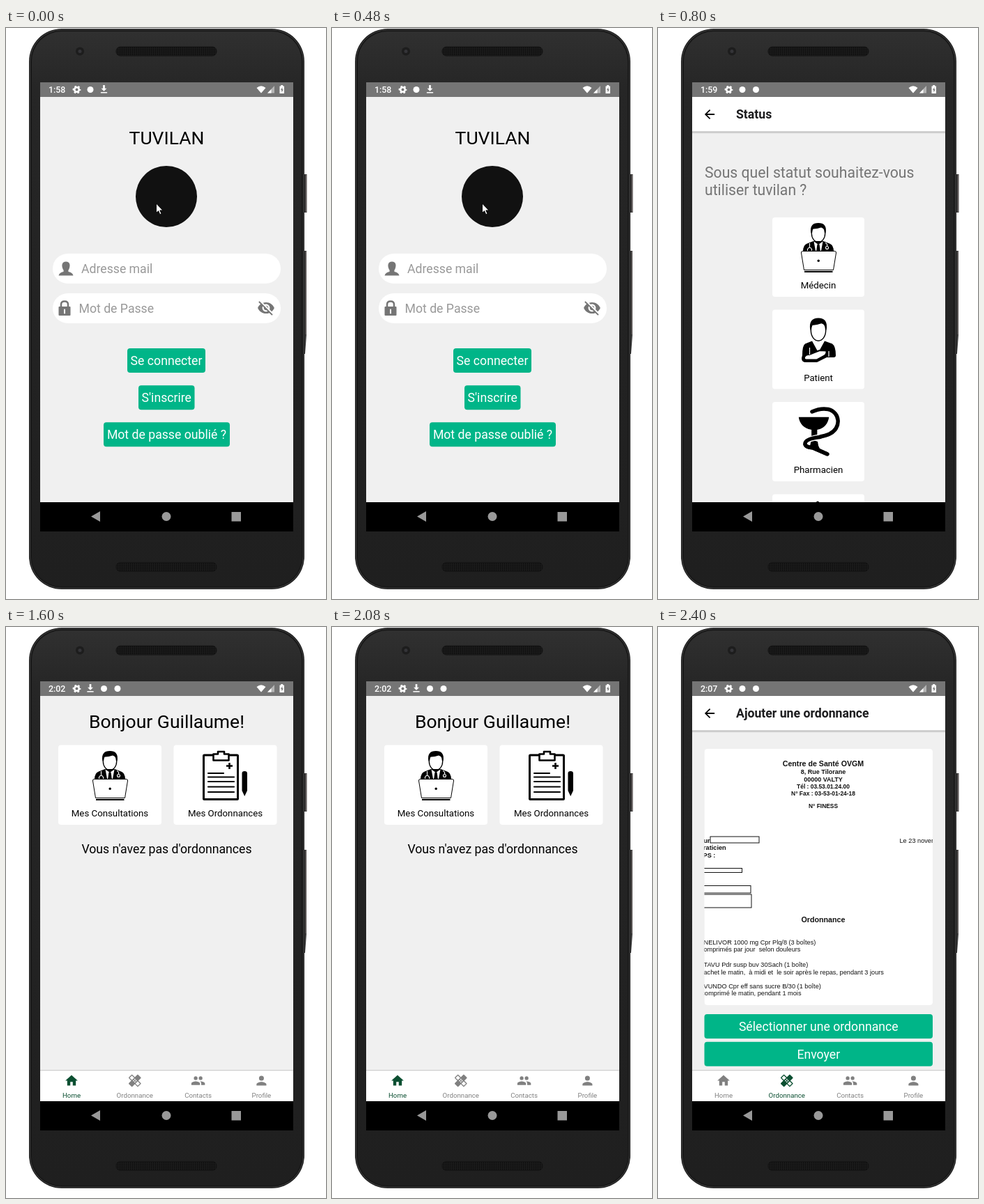
An HTML page for the animation above (3.2 s loop, 459x820 px).

```html
<!DOCTYPE html>
<html lang="fr">
<head>
<meta charset="utf-8">
<title>Application mobile</title>
<style>
html, body { margin: 0; width: 100%; height: 100%; overflow: hidden; background: #fff; }
svg { display: block; width: 100%; height: 100%; }
text { font-family: Roboto, sans-serif; white-space: pre; }
.doc text { font-family: "Liberation Sans", Arial, sans-serif; }
</style>
</head>
<body>
<svg id="stage" viewBox="0 0 459 820" xmlns="http://www.w3.org/2000/svg">
  <defs>
    <linearGradient id="shell" x2="0" y2="1">
      <stop offset="0" stop-color="#303030"/><stop offset=".1" stop-color="#262626"/><stop offset="1" stop-color="#1f1f1f"/>
    </linearGradient>
    <linearGradient id="shade" x2="0" y2="1">
      <stop offset="0" stop-color="#000" stop-opacity=".3"/><stop offset="1" stop-color="#000" stop-opacity="0"/>
    </linearGradient>
    <pattern id="mesh" width="3" height="3" patternUnits="userSpaceOnUse">
      <rect width="3" height="3" fill="#1c1c1c"/><circle cx="1.5" cy="1.5" r="1" fill="#0a0a0a"/>
    </pattern>
    <clipPath id="screen"><rect x="49" y="78" width="363" height="603"/></clipPath>
    <clipPath id="paper"><rect x="66.5" y="175" width="327.5" height="368" rx="4"/></clipPath>

    <g id="head">
      <ellipse cx="230" cy="295" rx="9.7" ry="12.5" fill="#fff" stroke="#000" stroke-width="1.3"/>
      <path d="M219.5 295C217.5 284 222 280 230 280S242.500 284 240.500 295L238.500 289Q236 287 234 286.500Q227 289 222 288.500Z"/>
    </g>
    <g id="doctor">
      <use href="#head"/>
      <path d="M208 321Q208 311.500 214 309.500L223 306H237L246 309.500Q252 311.500 252 321Z"/>
      <path d="M223.500 306.500L230 311L236.500 306.500L234 320H226Z" fill="#fff"/>
      <path d="M228.500 310.500H231.500L232.800 320H227.200Z"/>
      <path d="M217.500 309V315M214.500 320V317.500Q217.500 313 220.500 317.500V320M240 308.500Q243.500 310 242.500 313" fill="none" stroke="#fff" stroke-width="1.1"/>
      <circle cx="242.500" cy="315.500" r="2" fill="none" stroke="#fff" stroke-width="1.100"/>
      <path d="M207.500 320.500H253.500Q255.800 320.500 255.500 323L251.500 347.500H209.500L205.500 323Q205.200 320.500 207.500 320.500Z" fill="#fff" stroke="#000"/>
      <circle cx="230.200" cy="334.300" r="1.700"/>
      <path d="M210 350H250.500" stroke="#000" stroke-width="2"/>
    </g>
    <g id="patient">
      <use href="#head" transform="translate(-23 84.800) scale(1.100 1.185)"/>
      <path d="M207 470Q207 456 211 453.500L221 449.500L230 466L239 449.500L250 453.500Q255 457 255 470Q255 473 252 473H242L228 480H212Q206 480 206 474Z"/>
      <path d="M222 450L230 464L238 450L234 452H226Z" fill="#fff"/>
      <path d="M232 463L241.500 463.500Q242.500 468.500 238 471L228 476.500H212.500Q209 476 210 472.500Q212 468.500 217 469L223 466.500Z" fill="#fff" stroke="#000" stroke-width="2.200" stroke-linejoin="round"/>
      <path d="M217.500 469V459M245 464V472" stroke="#fff" stroke-width="1.200"/>
    </g>
    <g id="cup" fill="none">
      <path d="M221 551Q233 545.500 244 547.500C262 552 263 575 246 583C234 589 211 588 211 597Q211 602 222 603L243 612" stroke="#000" stroke-width="5.500" stroke-linecap="round"/>
      <path d="M201 558H246Q244 574 229 577.500V590H219.500V577.500Q203 574 201 558Z" fill="#000" stroke="#fff" stroke-width="1.300"/>
      <path d="M219.500 590.500Q219 600 216 604H232Q229.500 600 229 594" fill="#000"/>
      <path d="M211.500 597Q212 590 232 587.500" stroke="#fff" stroke-width="8"/>
      <path d="M211 597Q211 590 232 587.500M211 597Q211 602 222 602.500L242 611.500" stroke="#000" stroke-width="5.500" stroke-linecap="round"/>
    </g>
    <g id="clipboard" fill="none" stroke="#000">
      <rect x="283.500" y="184" width="49" height="63.500" rx="1" stroke-width="3"/>
      <path d="M297.500 191.500V182.500H304V179H313V182.500H319.500V191.500Z" fill="#fff" stroke-width="2.600" stroke-linejoin="round"/>
      <path d="M320.500 195V204M316 199.500H325" stroke-width="2.600"/>
      <path d="M290 210H312M290 215.500H327M290 222H327M290 229.500H327M290 237H327" stroke-width="2.200" stroke-linecap="round"/>
      <path d="M338.500 210Q338.500 207 342.200 207T346 210V235L342.200 243L338.500 235Z" fill="#000" stroke="none"/>
    </g>
  </defs>

  <g id="phone">
    <path d="M426 210H431.500V265H426ZM426 320H431V441L429 468H426Z" fill="#3a3a3a"/>
    <path d="M430.500 211V264M430 321V440" stroke="#6b6261"/>
    <rect x="33" y="1" width="395" height="805" rx="47" fill="#181818"/>
    <rect x="34.500" y="2.500" width="392" height="802" rx="45.500" fill="none" stroke="#454545"/>
    <rect x="37" y="5" width="387" height="797" rx="43" fill="url(#shell)"/>
    <circle cx="106" cy="33.500" r="6" fill="#1d1d1d"/><circle cx="106" cy="33.500" r="2.500" fill="#343438"/>
    <rect x="158" y="27" width="144" height="13" rx="6" fill="url(#mesh)" stroke="#141414"/>
    <rect x="158" y="767.500" width="144" height="13" rx="6" fill="url(#mesh)" stroke="#141414"/>
    <rect x="49" y="78" width="363" height="645" fill="#f0f0f0"/>
  </g>
  <g id="view" clip-path="url(#screen)"></g>
  <g id="nav">
    <rect x="49" y="681" width="363" height="42" fill="#000"/>
    <path d="M122 701.500L135 694V709ZM323.500 695H337V708.500H323.500Z" fill="#999"/>
    <circle cx="230" cy="701.500" r="6.500" fill="#999"/>
  </g>
</svg>
<script>
const GREEN = '#00b588', DIM = '#757575', UNIT = 17.66;

const paths = {
  back: 'M20 11H7.83l5.59-5.59L12 4l-8 8 8 8 1.41-1.41L7.83 13H20v-2z',
  home: 'M10 20v-6h4v6h5v-8h3L12 3 2 12h3v8z',
  heal: 'M17.73 12.02l3.98-3.98c.39-.39.39-1.02 0-1.41l-4.34-4.34c-.39-.39-1.02-.39-1.41 0l-3.98 3.98L8 2.29C7.8 2.1 7.55 2 7.29 2c-.25 0-.51.1-.7.29L2.25 6.63c-.39.39-.39 1.02 0 1.41l3.98 3.98L2.25 16c-.39.39-.39 1.02 0 1.41l4.34 4.34c.39.39 1.02.39 1.41 0l3.98-3.98 3.98 3.98c.2.2.45.29.71.29.26 0 .51-.1.71-.29l4.34-4.34c.39-.39.39-1.02 0-1.41zM12 9a1 1 0 0 1 0 2 1 1 0 0 1 0-2zM7.29 10.96L3.66 7.34l3.63-3.63 3.62 3.62zM10 13a1 1 0 0 1 0-2 1 1 0 0 1 0 2zM12 15a1 1 0 0 1 0-2 1 1 0 0 1 0 2zM14 11a1 1 0 0 1 0 2 1 1 0 0 1 0-2zM16.66 20.34l-3.63-3.62 3.63-3.63 3.62 3.62z',
  people: 'M16 11a3 3 0 1 0 0-6 3 3 0 0 0 0 6zM8 11a3 3 0 1 0 0-6 3 3 0 0 0 0 6zM8 13c-2.33 0-7 1.17-7 3.5V19h14v-2.500c0-2.330-4.670-3.500-7-3.500zM16 13c-.29 0-.62.02-.97.05 1.16.84 1.97 1.97 1.97 3.450V19h6v-2.500c0-2.330-4.670-3.500-7-3.500z',
  person: 'M12 12a4 4 0 1 0 0-8 4 4 0 0 0 0 8zM12 14c-2.670 0-8 1.340-8 4v2h16v-2c0-2.660-5.330-4-8-4z',
  hidden: 'M12 7c2.76 0 5 2.24 5 5 0 .65-.13 1.26-.36 1.83l2.92 2.92c1.51-1.26 2.7-2.89 3.43-4.75-1.73-4.39-6-7.5-11-7.5-1.4 0-2.74.25-3.98.7l2.16 2.16C10.74 7.13 11.35 7 12 7zM2 4.27l2.74 2.74C3.08 8.3 1.78 10.02 1 12c1.73 4.39 6 7.5 11 7.5 1.55 0 3.03-.3 4.38-.84L19.730 22 21 20.730 3.270 3zM7.530 9.800l1.550 1.550c-.05.21-.08.43-.08.65 0 1.660 1.340 3 3 3 .22 0 .44-.03.65-.08l1.550 1.550c-.67.33-1.410.53-2.200.53-2.760 0-5-2.240-5-5 0-.79.2-1.530.53-2.200zM11.840 9.020l3.150 3.150.02-.16c0-1.660-1.340-3-3-3z',
  load: 'M10 3h4v7h4l-6 6-6-6h4zM5 18h14v2.500H5z'
};

const text = (s, x, y, size = UNIT, fill = '#000', more = '') =>
  `<text x="${x}" y="${y}" font-size="${size}" fill="${fill}" ${more}>${s}</text>`;
const mid = (s, x, y, size, fill, more = '') => text(s, x, y, size, fill, 'text-anchor="middle" ' + more);
const box = (x, y, w, h, fill = '#fff', rx = 4, more = '') =>
  `<rect x="${x}" y="${y}" width="${w}" height="${h}" rx="${rx}" fill="${fill}" ${more}/>`;
const icon = (name, x, y, fill, k = 0.883) =>
  `<path d="${paths[name]}" fill="${fill}" transform="translate(${x} ${y}) scale(${k}) translate(-12 -12)"/>`;
const use = (id, x = 0, y = 0) => `<use href="#${id}" x="${x}" y="${y}"/>`;

const marks = {
  gear: x => `<g fill="none" stroke="#fff" transform="translate(${x} 88.500)">
    <circle r="3.300" stroke-width="2.600"/>
    <circle r="5" stroke-width="1.800" stroke-dasharray="2.618" stroke-dashoffset="1.300"/></g>`,
  dot: x => `<circle cx="${x}" cy="88.500" r="4.500" fill="#fff"/>`,
  load: x => icon('load', x, 88, '#fff', 0.66)
};

function statusBar(time, list) {
  return box(49, 78, 363, 21, DIM, 0) +
    text(time, 61, 93, 12.36, '#fff', 'font-weight="500"') +
    list.map((m, i) => marks[m](101.5 + 19.5 * i)).join('') +
    `<path d="M359.500 86Q366 80.500 372.500 86L366 93.500Z" fill="#fff"/>
     <path d="M385 83V93.500H375Z" fill="#b5b5b5"/><path d="M380.500 88V93.500H375Z" fill="#fff"/>
     <path d="M392.500 83.500H394.300V82H397.200V83.500H399V94H392.500Z" fill="#fff"/>
     <path d="M396.400 85L394 89.300H395.500V92.500L397.800 88.200H396.400Z" fill="${DIM}"/>`;
}

const header = title => box(49, 148, 363, 4, 'url(#shade)', 0) + box(49, 99, 363, 49.5, '#fff', 0) +
  icon('back', 74, 124, '#000') + text(title, 112, 130, UNIT, '#1c1c1e', 'font-weight="700"');

const button = (s, x, y, w) => box(x, y, w, 35, GREEN) + mid(s, x + w / 2, y + 24, UNIT, '#fff');

function tabs(active) {
  const items = [['home', 'Home'], ['heal', 'Ordonnance'], ['people', 'Contacts'], ['person', 'Profile']];
  return box(49, 637, 363, 44, '#fff', 0) + box(49, 636, 363, 1.3, '#d0d0d0', 0) +
    items.map(([name, label], i) => {
      const x = 94 + 90.8 * i, fill = i === active ? '#0b4f31' : '#808080';
      return icon(name, x, 651.5, fill) + mid(label, x, 676.3, 9.71, fill);
    }).join('');
}

function login() {
  return statusBar('1:58', ['gear', 'dot', 'load']) +
    mid('TUVILAN', 230.5, 167, 26.5) +
    '<circle cx="230" cy="242" r="44" fill="#111"/>' +
    '<path d="M215.500 252V265.500L218.600 262.700L220.800 267.700L223 266.700L220.800 261.900H225Z" fill="#fff" stroke="#000" stroke-width=".9"/>' +
    box(67, 324, 327, 43, '#fff', 21.5) + box(67, 381, 327, 43, '#fff', 21.5) +
    `<path d="M86 335.500C92 335.500 92.500 341 90.500 346Q88.500 348.500 89.500 350Q95.500 351 96.500 355.500H75.500Q76.500 351 82.500 350Q83.500 348.500 81.500 346C79.500 341 80 335.500 86 335.500Z" fill="${DIM}"/>` +
    box(75.5, 400, 17, 13, DIM, 1) +
    `<path d="M79 401V397Q79 392.500 84 392.500T89 397V401" fill="none" stroke="${DIM}" stroke-width="2.500"/>
     <path d="M84 404.500V409.500" stroke="#fff" stroke-width="2" stroke-linecap="round"/>` +
    text('Adresse mail', 108, 352, UNIT, '#999') + text('Mot de Passe', 104.500, 409, UNIT, '#999') +
    icon('hidden', 373, 402, DIM, 1.08) +
    button('Se connecter', 174, 460, 112) + button("S'inscrire", 190, 513.3, 80.5) +
    button('Mot de passe oublié ?', 140, 566.3, 181);
}

function roles() {
  const cards = [['doctor', 'Médecin'], ['patient', 'Patient'], ['cup', 'Pharmacien']];
  return statusBar('1:59', ['gear', 'dot', 'dot']) + header('Status') +
    text('Sous quel statut souhaitez-vous', 67, 215, 21.2, DIM) +
    text('utiliser tuvilan ?', 67, 240, 21.2, DIM) +
    cards.map(([id, label], i) => {
      const y = 272 + 132.5 * i;
      return box(164, y, 132, 114) + use(id) + mid(label, 230, y + 102, 13.25);
    }).join('') +
    box(164, 669.5, 132, 114) + '<circle cx="229" cy="681.500" r="2" fill="#000"/>';
}

function home() {
  return statusBar('2:02', ['gear', 'load', 'dot', 'dot']) +
    mid('Bonjour Guillaume!', 230.5, 145, 26.5) +
    box(75, 169.5, 148, 114.500) + use('doctor', -81, -102) + mid('Mes Consultations', 149, 272, 13.25) +
    box(240.5, 169.5, 148, 114.500) + use('clipboard') + mid('Mes Ordonnances', 314.5, 272, 13.25) +
    mid("Vous n'avez pas d'ordonnances", 230.5, 325) + tabs(0);
}

function prescription() {
  const ink = '#111', bold = 'font-weight="700"';
  const centred = [
    ['Centre de Santé OVGM', 200, 10.65], ['8, Rue Tilorane', 211, 9], ['00000 VALTY', 221.5, 9],
    ['Tél : 03.53.01.24.00', 231.5, 8.44], ['N° Fax : 03-53-01-24-18', 241.5, 8.44], ['N° FINESS', 260, 8.4],
    ['Ordonnance', 424, 10.7]
  ];
  const lines = [
    ['NELIVOR 1000 mg Cpr Plq/8 (3 boîtes)', 65.5, 456], ['omprimés par jour  selon douleurs', 65.5, 466],
    ['TAVU Pdr susp buv 30Sach (1 boîte)', 65.5, 487.5],
    ['achet le matin,  à midi et  le soir après le repas, pendant 3 jours', 65.5, 498.500],
    ['VUNDO Cpr eff sans sucre B/30 (1 boîte)', 65.5, 519], ['comprimé le matin, pendant 1 mois', 62.5, 529],
    ['Le 23 novembre', 346.5, 309.5]
  ];
  const left = [['ur', 65.5, 309.5], ['raticien', 65, 320], ['PS :', 64.5, 330.5]];
  const frames = [[75, 301, 70, 9], [60, 346.5, 60.5, 6], [60, 371.5, 73, 10.500], [60, 384, 74, 19]];
  return statusBar('2:07', ['gear', 'dot', 'dot']) + header('Ajouter une ordonnance') +
    '<g class="doc" clip-path="url(#paper)">' + box(66.5, 175, 327.5, 368) +
    centred.map(([s, y, size]) => mid(s, 237, y, size, ink, bold)).join('') +
    lines.map(([s, x, y]) => text(s, x, y, 9.2, ink)).join('') +
    left.map(([s, x, y]) => text(s, x, y, 9.2, ink, bold)).join('') +
    frames.map(r => box(...r, '#fff', 0, `stroke="${ink}"`)).join('') + '</g>' +
    button('Sélectionner une ordonnance', 66.5, 556, 327.5) + button('Envoyer', 66.5, 595.7, 327.5) + tabs(1);
}

const STEP = 800;
const view = document.getElementById('view');
view.innerHTML = [login, roles, home, prescription].map(f => `<g>${f()}</g>`).join('');
const scenes = [...view.children];

function draw(ms) {
  const now = Math.floor(ms / STEP) % scenes.length;
  scenes.forEach((g, i) => g.setAttribute('display', i === now ? 'inline' : 'none'));
}

const start = performance.now();
function tick() {
  draw(performance.now() - start);
  requestAnimationFrame(tick);
}
tick();
</script>
</body>
</html>
```
